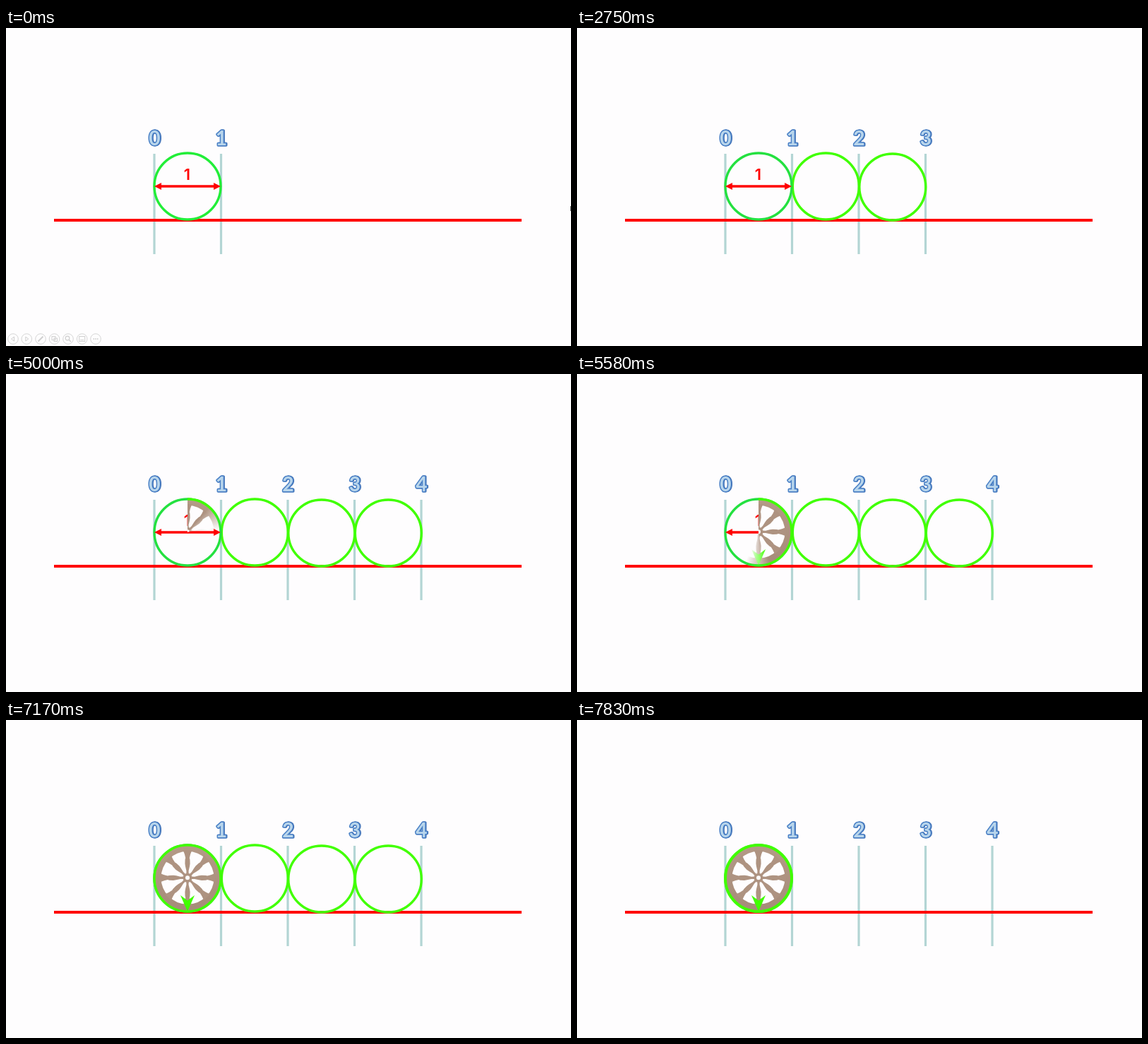
Write an HTML page with a canvas that moves like this. It is 800 by 450 pixels and loops after 8 s.

```html
<!DOCTYPE html>
<html lang="en">
<head>
<meta charset="utf-8">
<title>Measuring with a wheel</title>
<style>
  html, body { margin: 0; width: 100%; height: 100%; overflow: hidden; background: #fefdfe; }
  canvas { display: block; }
</style>
</head>
<body>
<canvas id="stage" width="800" height="450"></canvas>
<script>
const LOOP = 8000, FPS = 12, TAU = Math.PI * 2;
const RED = '#ff0000', LIME = '#40ff00', PALE = '#b3d5d4';
const CENTER = { x: 257, y: 224, r: 47 };
const ctx = document.getElementById('stage').getContext('2d');

const layer = document.createElement('canvas');
layer.width = 800;
layer.height = 450;
const wheelCtx = layer.getContext('2d');

const clamp = v => Math.min(1, Math.max(0, v));
const ramp = (t, from, to) => clamp((t - from) / (to - from));

function line(c, x1, y1, x2, y2, color, width) {
  c.strokeStyle = color;
  c.lineWidth = width;
  c.beginPath();
  c.moveTo(x1, y1);
  c.lineTo(x2, y2);
  c.stroke();
}

function polygon(c, points, color) {
  c.fillStyle = color;
  c.beginPath();
  points.forEach(([x, y]) => c.lineTo(x, y));
  c.closePath();
  c.fill();
}

function disc(c, x, y, r, color) {
  c.fillStyle = color;
  c.beginPath();
  c.arc(x, y, r, 0, TAU);
  c.fill();
}

function ring(c, x, y, r, color, width) {
  c.strokeStyle = color;
  c.lineWidth = width;
  c.beginPath();
  c.arc(x, y, r, 0, TAU);
  c.stroke();
}

function withAlpha(alpha, draw) {
  if (alpha <= 0) return;
  ctx.save();
  ctx.globalAlpha = alpha;
  draw();
  ctx.restore();
}

const markX = n => 210 + n * 94.5;

function label(n) {
  const x = markX(n) + 0.3, y = 165.5;
  ctx.font = 'bold 28px Lato, Carlito, sans-serif';
  ctx.textAlign = 'center';
  ctx.lineJoin = 'round';
  ctx.lineWidth = 3;
  ctx.strokeStyle = '#3b69ae';
  ctx.strokeText(n, x + 0.8, y + 0.8);
  ctx.strokeStyle = '#4a80c6';
  ctx.strokeText(n, x, y);
  ctx.fillStyle = '#b9d6ec';
  ctx.fillText(n, x, y);
}

const tick = n => line(ctx, markX(n), 178, markX(n), 320, PALE, 3.2);

function diameter() {
  const { x, y } = CENTER;
  line(ctx, 217, y, 297, y, RED, 3.4);
  polygon(ctx, [[210, y], [220, y - 5], [220, y + 5]], RED);
  polygon(ctx, [[304, y], [294, y - 5], [294, y + 5]], RED);
  ctx.font = '600 22px Inter, sans-serif';
  ctx.textAlign = 'center';
  ctx.fillStyle = RED;
  ctx.fillText('1', x - 0.5, 215);
}

function drawWheel(c, ringWidth) {
  const { x, y, r } = CENTER, hubY = y - 0.7;
  const wood = c.createLinearGradient(0, y - r, 0, y + r);
  wood.addColorStop(0, '#b49a87');
  wood.addColorStop(1, '#a68b79');
  disc(c, x, y, r, wood);
  disc(c, x, hubY, 37.5, '#fefdfe');

  // Half width of a spoke at each distance from the hub.
  const profile = [[4, 1.7], [10, 1.6], [16, 3], [20, 3.6], [26, 3.4], [28, 2.8], [33, 4], [39, 6.2]];
  const outline = [
    ...profile.map(([d, w]) => [w, -d]),
    ...profile.slice().reverse().map(([d, w]) => [-w, -d])
  ];
  for (let i = 0; i < 8; i++) {
    c.save();
    c.translate(x, hubY);
    c.rotate(i * TAU / 8);
    polygon(c, outline, '#ae9381');
    c.restore();
  }
  disc(c, x, hubY, 6.5, '#ae9381');
  disc(c, x, hubY, 3, '#fefdfe');
  ring(c, x, y, r, LIME, ringWidth);
  polygon(c, [[x, 271], [x - 10, 248], [x, 255.5], [x + 10, 248]], LIME);
}

function wheel(t) {
  const soft = 45, lead = (t - 4575) * 0.2025;
  if (lead <= 0) return;
  const { x, y } = CENTER;
  const c = wheelCtx;
  c.clearRect(0, 0, 800, 450);
  drawWheel(c, 3.4 + 0.6 * ramp(t, 7160, 7700));
  if (lead < 360 + soft) {
    const mask = c.createConicGradient(-Math.PI / 2, x, y);
    for (const angle of [0, lead - soft, lead, 360]) {
      const a = Math.min(360, Math.max(0, angle));
      mask.addColorStop(a / 360, `rgba(0,0,0,${clamp((lead - a) / soft)})`);
    }
    c.save();
    c.globalCompositeOperation = 'destination-in';
    c.fillStyle = mask;
    c.fillRect(0, 0, 800, 450);
    c.restore();
  }
  ctx.drawImage(layer, 0, 0);
}

function toolbar() {
  const grey = '#cfcfcf', y = 440;
  const xs = [10, 29.3, 49, 68.5, 88, 107.7, 127];
  xs.forEach(x => ring(ctx, x, y, 7.3, '#d6d6d6', 1));
  ctx.strokeStyle = grey;
  ctx.lineWidth = 1;
  ctx.lineJoin = 'miter';
  [-1, 1].forEach((side, i) => {
    const x = xs[i];
    ctx.beginPath();
    ctx.moveTo(x + side * 2.5, y);
    ctx.lineTo(x - side * 1.5, y - 3);
    ctx.lineTo(x - side * 1.5, y + 3);
    ctx.closePath();
    ctx.stroke();
  });
  line(ctx, xs[2] - 3.5, y + 3.5, xs[2] + 3.5, y - 3.5, grey, 2);
  ctx.lineWidth = 1;
  ctx.strokeRect(xs[3] - 3.5, y - 3.5, 5, 5);
  ctx.strokeRect(xs[3] - 0.5, y - 1, 4.5, 4.5);
  ring(ctx, xs[4] - 1, y - 1, 2.8, grey, 1.2);
  line(ctx, xs[4] + 1, y + 1, xs[4] + 4, y + 4, grey, 1.5);
  ctx.lineWidth = 1;
  ctx.strokeRect(xs[5] - 4, y - 3.5, 8, 7);
  line(ctx, xs[5] - 2.5, y + 1.5, xs[5] + 2.5, y + 1.5, grey, 1);
  [-2.7, 0, 2.7].forEach(dx => disc(ctx, xs[6] + dx, y, 0.9, grey));
  ctx.fillStyle = '#555';
  ctx.fillRect(799, 252, 1, 7);
}

function render(t) {
  ctx.fillStyle = '#fefdfe';
  ctx.fillRect(0, 0, 800, 450);

  const shown = [1, 1, ramp(t, 1400, 1833), ramp(t, 2417, 2750), ramp(t, 3417, 3833)];
  const remaining = 1 - ramp(t, 7160, 7700);

  shown.forEach((a, n) => withAlpha(a, () => tick(n)));
  line(ctx, 68, 272, 730, 272, RED, 4);
  shown.forEach((a, n) => withAlpha(a, () => label(n)));
  for (let n = 2; n <= 4; n++) {
    const y = n === 2 ? 224 : 225;
    withAlpha(shown[n] * remaining, () => ring(ctx, markX(n) - 46.7, y, CENTER.r, LIME, 3.4));
  }
  ring(ctx, CENTER.x, CENTER.y, CENTER.r, t < 2490 ? '#22ee38' : '#24e140', 3.4);
  diameter();
  wheel(t);
  withAlpha(1 - ramp(t, 500, 667), toolbar);
}

function frame(now) {
  const t = now % LOOP;
  render(Math.floor(t * FPS / 1000 + 0.05) * 1000 / FPS);
  requestAnimationFrame(frame);
}

render(0);
requestAnimationFrame(frame);
</script>
</body>
</html>
```
